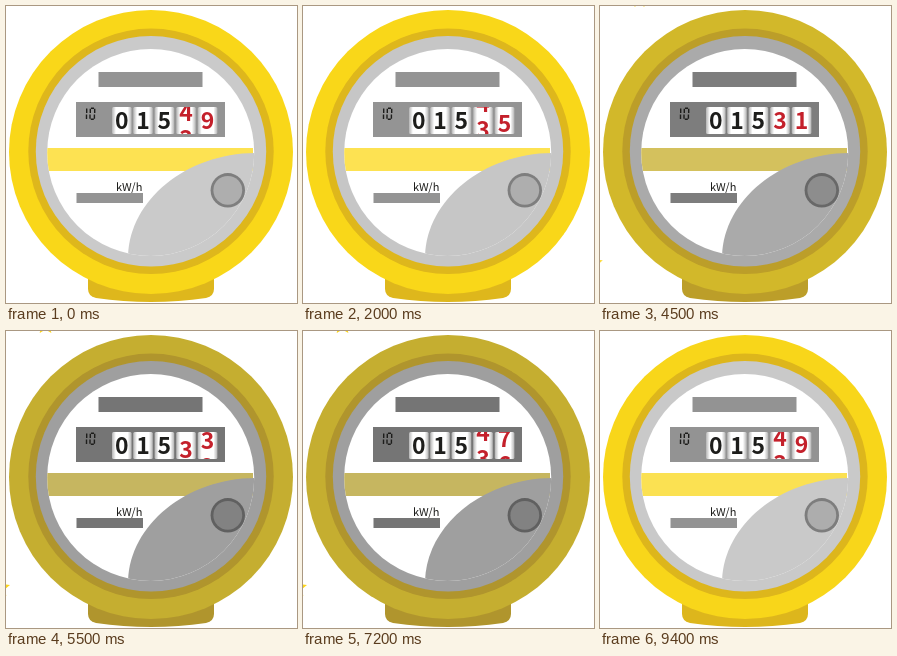
An HTML page that plays this animation: 291 by 297 pixels, repeating every 9.5 s.

```html
<!DOCTYPE html>
<html lang="en">
<head>
<meta charset="utf-8">
<title>Electricity meter</title>
<style>
  html, body { margin: 0; width: 100%; height: 100%; overflow: hidden; background: #fff; }
  svg { display: block; width: 100vw; height: 100vh; }
  text { font-family: "Noto Sans CJK JP", "Noto Sans CJK SC", "Noto Sans", sans-serif; }
  .digit { font-size: 23px; font-weight: 700; text-anchor: middle; }
</style>
</head>
<body>
<svg viewBox="0 0 291 297" preserveAspectRatio="none">
  <defs>
    <clipPath id="face"><circle cx="144.7" cy="146.5" r="103.5"/></clipPath>
    <clipPath id="slot"><rect x="100" y="101" width="116" height="27"/></clipPath>
    <linearGradient id="drum">
      <stop offset="0" stop-color="#b4b4b4"/>
      <stop offset=".2" stop-color="#fff"/>
      <stop offset=".8" stop-color="#fff"/>
      <stop offset="1" stop-color="#b4b4b4"/>
    </linearGradient>
  </defs>
  <g id="stars" fill="#fcd51c"></g>
  <path data-tone="rim" d="M82 268V283Q82 290 90 292Q145 300 200 292Q208 290 208 283V268Z"/>
  <circle data-tone="body" cx="145" cy="146" r="142"/>
  <circle data-tone="rim" cx="145" cy="145.3" r="122.7"/>
  <circle data-tone="ring" cx="145" cy="145.3" r="115.2"/>
  <circle cx="144.7" cy="146.5" r="103.5" fill="#fff"/>
  <g clip-path="url(#face)">
    <rect data-tone="band" x="40" y="142" width="207" height="23"/>
    <path data-tone="ring" d="M250 147C180 147 122 195 122 252H250Z"/>
  </g>
  <g data-tone="bar">
    <rect x="92.5" y="66" width="104" height="15"/>
    <rect x="70.5" y="187" width="66.5" height="10"/>
    <rect x="70" y="96" width="149" height="35"/>
  </g>
  <path d="M80.7 102.5V107M80.5 108.5V113M84.3 102.7V107M84 108.5V112.8M88.7 102.7V107M88.4 108.5V112.8M85 102.3H88M84.8 113.2H87.8"
        fill="none" stroke="#1d1d1b" stroke-width="1.4"/>
  <text x="110" y="184.5" font-size="11" fill="#1d1d1b">kW/h</text>
  <g id="counter" clip-path="url(#slot)"></g>
  <circle data-tone="knob" cx="221.8" cy="184.3" r="17.2"/>
  <circle data-tone="button" cx="221.8" cy="184.3" r="14.4"/>
</svg>
<script>
const LOOP = 9500, PITCH = 26, BASE = 123.3;
const NS = "http://www.w3.org/2000/svg";
const $ = id => document.getElementById(id);

// day and night colour of each part
const TONES = {
  body: [[249, 215, 25], [197, 174, 48]],
  rim: [[222, 183, 28], [176, 149, 45]],
  ring: [[202, 202, 202], [159, 159, 159]],
  band: [[253, 226, 82], [198, 182, 96]],
  bar: [[148, 148, 148], [117, 117, 117]],
  knob: [[126, 126, 126], [96, 96, 96]],
  button: [[174, 174, 174], [130, 130, 130]]
};

// reading of the last wheel: seconds, digit, speed
const KEYS = [
  [0, 9, -1.3], [2, 5.1, -2.15], [4.2, 1, 0], [4.55, 1, 0],
  [5.5, 2.8, 2.3], [7.2, 6.73, 1.9], [8.1, 8.05, 1], [9.5, 9, 0.4]
];

function add(parent, tag, attrs, content = "") {
  const el = document.createElementNS(NS, tag);
  for (const k in attrs) el.setAttribute(k, attrs[k]);
  el.textContent = content;
  parent.append(el);
  return el;
}

const clamp = x => Math.min(1, Math.max(0, x));
const ramp = (t, a, b) => clamp((t - a) / (b - a));

function reading(t) {
  let i = 0;
  while (i < KEYS.length - 2 && t > KEYS[i + 1][0]) i++;
  const [t0, a, va] = KEYS[i], [t1, b, vb] = KEYS[i + 1];
  const h = t1 - t0, x = (t - t0) / h, y = 1 - x;
  return y * y * (1 + 2 * x) * a + x * x * (3 - 2 * x) * b
       + h * x * y * (y * va - x * vb);
}

function mix([a, b], k) {
  return `rgb(${a.map((v, i) => Math.round(v + (b[i] - v) * k)).join()})`;
}

function star(cx, cy, r) {
  const pts = Array.from({ length: 10 }, (_, i) => {
    const a = i * Math.PI / 5 - Math.PI / 2, d = i % 2 ? r * 0.45 : r;
    return (cx + d * Math.cos(a)).toFixed(2) + "," + (cy + d * Math.sin(a)).toFixed(2);
  });
  return pts.join(" ");
}

const STARS = [[39.5, -6, 10], [-5.5, 257, 10]];
const starEls = STARS.map(() => add($("stars"), "polygon", {}));
const parts = [...document.querySelectorAll("[data-tone]")];

const counter = $("counter");
const CENTERS = [115.8, 137, 158.4, 180, 201.6];
CENTERS.forEach(x => add(counter, "rect",
  { x: x - 9.8, y: 101, width: 19.6, height: 27, rx: 1.5, fill: "url(#drum)" }));
[0, 1, 5].forEach((d, i) => add(counter, "text",
  { x: CENTERS[i], y: BASE, class: "digit", fill: "#1d1d1b" }, d));

function wheel(x) {
  const g = add(counter, "g", { fill: "#c4202b" });
  for (let d = 0; d < 10; d++) add(g, "text", { x, y: BASE - d * PITCH, class: "digit" }, d);
  return pos => g.setAttribute("transform", `translate(0 ${(pos * PITCH).toFixed(2)})`);
}
const setTens = wheel(CENTERS[3]), setUnits = wheel(CENTERS[4]);

function draw(ms) {
  const t = ms / 1000;
  const night = ramp(t, 3, 5) * (1 - ramp(t, 7.65, 9.45));
  const haze = t < 5 ? Math.max(night, 0.1 * ramp(t, 0, 2)) : night;
  parts.forEach(el => {
    const tone = el.dataset.tone;
    el.setAttribute("fill", mix(TONES[tone], tone === "ring" ? haze : night));
  });

  const glow = ramp(t, 4, 5) * (1 - ramp(t, 7.6, 8.6));
  $("stars").setAttribute("opacity", clamp(glow * 1.7));
  starEls.forEach((el, i) => {
    const [x, y, r] = STARS[i];
    el.setAttribute("points", star(x, y, r * (0.75 + 0.25 * glow)));
  });

  const u = reading(t);
  setUnits(u);
  setTens(3 + (u - 1) * 2.22 / PITCH);
}

function tick(now) {
  draw(Math.floor((now % LOOP) / 100) * 100);
  requestAnimationFrame(tick);
}
draw(0);
requestAnimationFrame(tick);
</script>
</body>
</html>
```
